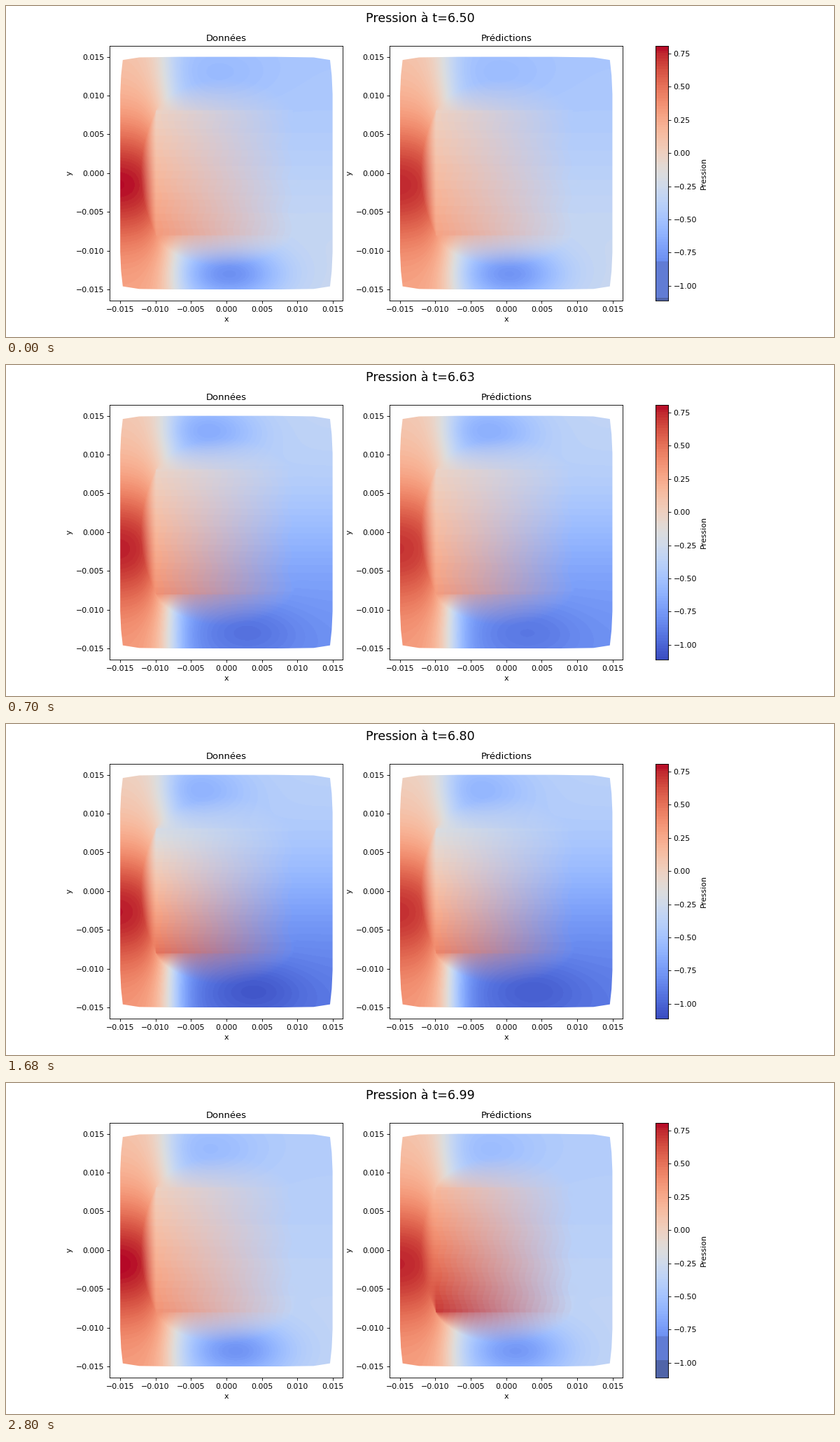
Recreate the animation shown at these times as a matplotlib script. Size 1183 px wide and 473 px high, loop 2.94 s.

```python
import numpy as np
import matplotlib.pyplot as plt
from matplotlib.animation import FuncAnimation
from matplotlib.patches import Polygon

W, H, DPI = 1183, 473, 78.87
FRAMES, STEP = 21, 140
LIM, R = 0.01643, 0.015
P_MIN, P_MAX = -1.111, 0.808
CMAP = plt.get_cmap("coolwarm")

# Shedding cycle: phase, stagnation peak, its height, two bar limits,
# then (corner, low, low position, right side, body) for top and for bottom.
POSES = np.array([
    [0.050, 0.80, -0.10, -0.82, -1.09, 0.10, -0.56, -0.10, -0.48, -0.02, 0.25, -0.80, 0.02, -0.28, 0.33],
    [0.190, 0.78, -0.18, -1.20, -1.20, 0.00, -0.62, -0.30, -0.36, -0.20, 0.30, -1.06, 0.25, -0.92, 0.50],
    [0.500, 0.78, 0.10, -0.84, -1.10, 0.25, -0.80, 0.05, -0.30, 0.35, 0.10, -0.55, -0.15, -0.45, 0.04],
    [0.585, 0.76, 0.20, -0.83, -1.01, 0.32, -0.93, 0.10, -0.60, 0.42, 0.10, -0.60, -0.25, -0.42, -0.08],
    [0.725, 0.76, 0.22, -1.20, -1.20, 0.35, -1.05, 0.30, -0.92, 0.48, 0.00, -0.62, -0.28, -0.32, -0.15],
    [0.950, 0.81, -0.12, -0.80, -0.98, 0.10, -0.56, -0.20, -0.42, 0.00, 0.28, -0.78, 0.08, -0.33, 0.36],
    [0.965, 0.74, -0.05, -0.89, -0.89, 0.10, -0.70, 0.10, -0.62, 0.06, 0.28, -0.80, -0.03, -0.25, 0.24],
])


def mirrored(poses):
    m = poses.copy()
    m[:, 0] = (m[:, 0] + 0.5) % 1
    m[:, 2] *= -1
    m[:, 5:10], m[:, 10:15] = poses[:, 10:15], poses[:, 5:10]
    return m


KNOTS = np.vstack([POSES, mirrored(POSES)])


def pose_at(i):
    phase = (0.05 + 0.845 * i) % 1
    return np.array([np.interp(phase, KNOTS[:, 0], col, period=1)
                     for col in KNOTS[:, 1:].T])


# Unit grid over the domain, v pointing up
U, V = np.meshgrid(np.linspace(-1, 1, 304), np.linspace(1, -1, 332))
LEFT, RIGHT, HALF = -0.664, 0.620, 0.536


def body_weight():
    """1 on the square body, fading to 0 on the bulged outline around it."""
    c = (2 * U - LEFT - RIGHT) / (RIGHT - LEFT)
    d = V / HALF
    in_u, in_v = np.abs(c) <= 1, np.abs(d) <= 1
    side = np.clip(1 - d ** 2, 1e-6, 1)
    lid = 0.27 * np.clip(1 - c ** 2, 1e-6, 1) ** 0.7
    m = np.where(in_u & in_v, 1.0, 0.0)
    for inside, gap, bulge, k in (
            (in_v, LEFT - U, 0.145 * side, 1.0),
            (in_v, U - RIGHT, 0.12 * side, 0.85),
            (in_u, np.abs(V) - HALF, lid, 0.8)):
        t = gap / bulge
        m = np.where(inside & (gap > 0) & (t < 1), k * (1 - t), m)
    return m[..., None]


BODY = body_weight()


def color(p):
    p = np.round(p / 0.02) * 0.02
    return CMAP((p - P_MIN) / (P_MAX - P_MIN))[..., :3]


def field(pose, heat=0.0):
    peak, v0 = pose[:2]
    (e_t, l_t, u_t, r_t, q_t), (e_b, l_b, u_b, r_b, q_b) = pose[4:9], pose[9:14]

    # upstream wall with the stagnation zone
    end = e_b + (e_t - e_b) * (V + 1) / 2
    left = end + (peak - end) * np.exp(-((V - v0) / 0.55) ** 2)

    # wake side with a low on each flank
    up = 0.5 + 0.5 * np.tanh(1.6 * V)
    wake = r_b + (r_t - r_b) * up
    right = wake.copy()
    for low, u0, vc in ((l_t, u_t, 0.87), (l_b, u_b, -0.87)):
        g = np.exp(-((U - u0) / 0.5) ** 2 - ((V - vc) / 0.24) ** 2)
        right += (low - wake) * g
    w = 1 / (1 + np.exp((U + 0.56 - 0.25 * v0 * V) / 0.085))
    outer = color(w * left + (1 - w) * right)

    # body: banded blend from the front face to the rear face
    s = np.clip((V + HALF) / (2 * HALF), 0, 1)
    front = q_b + (q_t - q_b) * s + heat * (1 - 0.6 * s)
    a = np.clip((U - LEFT) / (RIGHT - LEFT), 0, 1)
    wobble = 0.3 * np.sin(23 * V + 5 * U) - 8 * v0 * V * (1 - a)
    a = np.clip((np.round(a * 22 + wobble) - wobble * 0.8) / 22, 0, 1)[..., None]
    inner = (1 - a) * color(front) + a * color(wake)
    return outer + (inner - outer) * BODY


def predicted(pose):
    p = pose.copy()
    p[0] -= 0.05
    p[[5, 10]] *= 0.97
    p[[8, 13]] *= 0.85
    return p


BAR_P = np.linspace(P_MAX, P_MIN, 364)


def bar(pose):
    rgb = color(np.minimum(BAR_P, pose[0]))
    rgb[BAR_P < pose[2]] = np.array([97, 124, 212]) / 255
    rgb[BAR_P < pose[3]] = np.array([80, 100, 168]) / 255
    return rgb[:, None, :]


def place(x, y, w, h):
    return [x / W, 1 - (y + h) / H, w / W, h / H]


fig = plt.figure(figsize=(1183.01 / DPI, 473.01 / DPI), dpi=DPI, facecolor="white")
title = fig.suptitle("", fontsize=16, y=0.98)

QUARTER = np.array([(-0.82, 0.995), (-0.974, 0.973), (-0.99, 0.84), (-0.998, 0.68)])
TOP_LEFT = np.vstack([[(-0.45, 1.0)], QUARTER])
LEFT_SIDE = np.vstack([TOP_LEFT, TOP_LEFT[::-1] * [1, -1]])
OUTLINE = np.vstack([LEFT_SIDE, LEFT_SIDE[::-1] * [-1, 1]]) * R
TICKS = np.arange(-3, 4) * 0.005


def panel(x, name):
    ax = fig.add_axes(place(x, 56.8, 333, 364.2))
    im = ax.imshow(np.ones((332, 304, 3)), extent=(-R, R, -R, R), aspect="auto",
                   interpolation="bilinear")
    ax.set(xlim=(-LIM, LIM), ylim=(-LIM, LIM), xticks=TICKS, yticks=TICKS,
           xlabel="x", ylabel="y")
    ax.set_title(name, fontsize=12)
    im.set_clip_path(Polygon(OUTLINE, transform=ax.transData))
    return im


data_im = panel(148.4, "Données")
pred_im = panel(548.2, "Prédictions")

cax = fig.add_axes(place(927.8, 56.8, 18.2, 364.2))
bar_im = cax.imshow(np.ones((364, 1, 3)), extent=(0, 1, P_MIN, P_MAX),
                    aspect="auto", interpolation="nearest")
cax.set(xticks=[], yticks=np.arange(-4, 4) * 0.25, ylim=(P_MIN, P_MAX))
cax.yaxis.tick_right()
cax.yaxis.set_label_position("right")
cax.yaxis.set_major_formatter(lambda p, _: f"{p:.2f}".replace("-", "\u2212"))
cax.set_ylabel("Pression")


def update(i):
    pose = pose_at(i)
    heat = 0.4 * (max(0, i - 18) / 2) ** 2
    title.set_text(f"Pression à t={6.5045 + 0.0244 * i:.2f}")
    data_im.set_data(np.clip(field(pose), 0, 1))
    pred_im.set_data(np.clip(field(predicted(pose), heat), 0, 1))
    bar_im.set_data(bar(pose))
    return title, data_im, pred_im, bar_im


anim = FuncAnimation(fig, update, frames=FRAMES, init_func=lambda: update(0),
                     interval=STEP, repeat=True, repeat_delay=0, blit=False)
plt.show()
```
